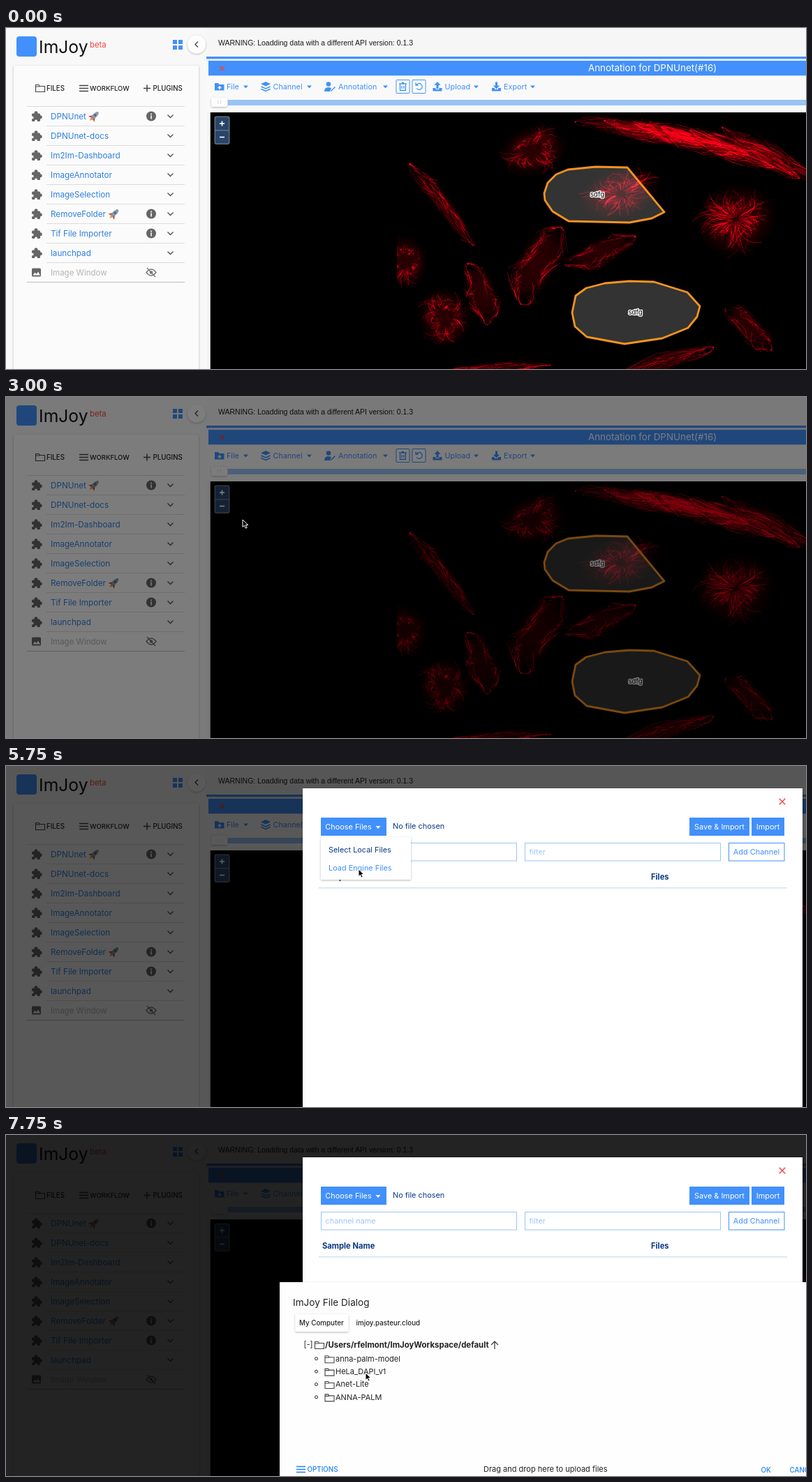
Recreate the animation shown at these times as an HTML page with a canvas. Size 1146 by 489 pixels, loop 8 s.

```html
<!DOCTYPE html>
<html lang="en">
<head>
<meta charset="utf-8">
<title>Image annotation workspace</title>
<style>
  html, body { margin: 0; width: 100%; height: 100%; overflow: hidden; background: #f6f6f6; }
  #stage { position: relative; width: 1146px; height: 489px; overflow: hidden; }
  canvas, svg { position: absolute; left: 0; top: 0; display: block; }
  text { font-family: Inter, Roboto, sans-serif; white-space: pre; }
  .arial { font-family: 'Liberation Sans', Arial, sans-serif; }
</style>
</head>
<body>
<div id="stage">
  <canvas id="cells" width="1146" height="489"></canvas>
  <svg id="ui" width="1146" height="489" viewBox="0 0 1146 489"></svg>
</div>
<script>
const BLUE = '#4290fb', DEEP = '#1f80fb', NAVY = '#0b3a82', GREY = '#666', INK = '#222', RED = '#f5413d';

/* ---------- microscope image ---------- */
const ctx = document.getElementById('cells').getContext('2d');
let seed = 71;
const rnd = () => {
  seed = (seed + 0x6D2B79F5) | 0;
  let v = Math.imul(seed ^ (seed >>> 15), 1 | seed);
  v ^= v + Math.imul(v ^ (v >>> 7), 61 | v);
  return ((v ^ (v >>> 14)) >>> 0) / 4294967296;
};
const spread = s => (rnd() * 2 - 1) * s;

// a dim body with fibres on top; fibre() returns points in the unit disc
function cell(x, y, a, b, deg, fibre) {
  ctx.save();
  ctx.translate(x, y);
  ctx.rotate(deg * Math.PI / 180);
  ctx.scale(a, b);
  const g = ctx.createRadialGradient(0, 0, 0, 0, 0, 1);
  g.addColorStop(0, 'rgba(110,0,6,.4)');
  g.addColorStop(0.6, 'rgba(110,0,6,.3)');
  g.addColorStop(1, 'rgba(90,0,0,0)');
  ctx.fillStyle = g;
  ctx.fillRect(-1, -1, 2, 2);
  ctx.scale(1 / a, 1 / b);
  for (let i = a * b * 0.05 + 25; i > 0; i--) {
    ctx.strokeStyle = `rgba(${170 + rnd() * 70 | 0},0,16,${0.15 + 0.4 * rnd() ** 2})`;
    ctx.lineWidth = 0.6 + rnd() * 0.6;
    ctx.beginPath();
    for (const [u, v] of fibre()) ctx.lineTo(u * a + spread(0.7), v * b + spread(0.7));
    ctx.stroke();
  }
  ctx.restore();
}
const steps = Array.from({ length: 9 }, (_, i) => i / 8);

// fibres leaving the centre towards a lobed rim
function star(x, y, a, b, core = 0.2) {
  const phase = rnd() * 6;
  cell(x, y, a, b, -15, () => {
    const th = rnd() * 2 * Math.PI, bend = spread(0.6), r0 = core + rnd() * 0.3;
    const r1 = (0.5 + rnd() * 0.5) * (0.85 + 0.25 * Math.sin(3 * th + phase));
    return steps.map(s => {
      const r = r0 + (r1 - r0) * s, q = th + bend * s * s;
      return [r * Math.cos(q), r * Math.sin(q)];
    });
  });
}
// fibres along an uneven spindle; hole keeps the nucleus empty
function spindle(x, y, a, b, deg, hole = 0) {
  const phase = rnd() * 6, curl = spread(0.3);
  cell(x, y, a, b, deg, () => {
    const k = Math.sign(spread(1)) * (hole + rnd() * (1 - hole));
    const from = spread(1), len = spread(0.6), tilt = spread(0.6);
    return steps.map(s => {
      const u = Math.max(-1, Math.min(1, from + len * s));
      const w = Math.sqrt(1 - u * u) * (0.85 + 0.25 * Math.sin(4 * u + phase + Math.sign(k)));
      return [u, w * (k + tilt * (s - 0.5)) + curl * u * u];
    });
  });
}
function paintCells() {
  ctx.fillStyle = '#000';
  ctx.fillRect(292.5, 121, 854, 368);
  ctx.beginPath();
  ctx.rect(560, 121, 586, 368);
  ctx.clip();
  ctx.globalCompositeOperation = 'lighter';
  star(755, 176, 50, 36, 0.25);
  star(880, 237, 60, 36, 0.1);
  star(1045, 275, 60, 52, 0.05);
  star(572, 335, 32, 38, 0.25);
  star(628, 415, 38, 44, 0.25);
  spindle(761, 338, 62, 30, -62, 0.5);
  spindle(852, 321, 54, 19, -22, 0.5);
  spindle(681, 380, 46, 23, 72, 0.5);
  spindle(1066, 430, 44, 18, 42, 0.4);
  spindle(626, 252, 74, 13, 52);
  spindle(935, 482, 82, 14, -18);
  spindle(700, 488, 80, 9, -4);
  // overlapping strands fanning out over the upper right
  for (let i = 0; i < 6; i++) spindle(900 + 40 * i, 145 + 8 * i, 85, 15, 8 + 4 * i);
}
paintCells();

/* ---------- interface ---------- */
const T = (x, y, s, size = 10.9, fill = NAVY, more = '') =>
  `<text x="${x}" y="${y + size * 0.36}" font-size="${size}" fill="${fill}" ${more}>${s}</text>`;
const R = (x, y, w, h, fill, more = '') =>
  `<rect x="${x}" y="${y}" width="${w}" height="${h}" fill="${fill}" ${more}/>`;
const C = (x, y, r, fill, more = '') => `<circle cx="${x}" cy="${y}" r="${r}" fill="${fill}" ${more}/>`;
const line = (d, color, w = 1.3) => `<path d="${d}" stroke="${color}" stroke-width="${w}" fill="none"/>`;
const solid = (d, color) => `<path d="${d}" fill="${color}"/>`;
const G = (id, s) => `<g id="${id}">${s}</g>`;
const at = (x, y, s, turn = 0) => `<g transform="translate(${x} ${y}) rotate(${turn})">${s}</g>`;
const each = (items, draw) => items.map(draw).join('');
const BOLD = 'font-weight="700"', MED = 'font-weight="500"', MID = 'text-anchor="middle"';
const SHADOW = 'filter="url(#soft)"';

const folder = (x, y) => at(x, y, line('M.5 10.5V.5h4.5l1.5 2h7v8zM.5 3h6', '#444', 1.1));
const caret = (x, y, c = BLUE) => solid(`M${x} ${y}h7l-3.5 4z`, c);
const cross = (x, y, r) => at(x, y, line(`M${-r} 0h${2 * r}M0 ${-r}v${2 * r}`, RED, 1.4), 45);
const plus = (x, y, r, c) => line(`M${x - r} ${y}h${2 * r}m${-r} ${-r}v${2 * r}`, c, 1.5);
const bars = (x, y, c) => line(`M${x} ${y}h13m-13 4h13m-13 4h13`, c, 1.4);
const puzzle = y => at(36, y - 8,
  R(1, 4, 12, 11.5, GREY, 'rx="1.5"') + C(7, 3.2, 2.5, GREY) + C(13.2, 9.2, 2.5, GREY) +
  C(1.6, 10, 2, '#fbfbfb') + C(7, 15, 2, '#fbfbfb'));
const rocket = (x, y) => at(x, y,
  solid('M0-3l6 9-6-2-6 2z', '#c8402f') + solid('M-2 5h4l-2 4z', '#f59a23') +
  '<ellipse rx="3" ry="7" cy="-1.5" fill="#8b97a3"/>' + C(0, -2, 1.4, '#2d5f8c'), 45);
const info = y => C(208, y, 7, GREY) + line(`M208 ${y - 4}v2m0 1v5`, '#fff', 1.6);
const chevron = y => line(`M231.5 ${y - 2}l4 4 4-4`, '#555', 1.4);

const plugins = ['DPNUnet 🚀', 'DPNUnet-docs', 'Im2Im-Dashboard', 'ImageAnnotator', 'ImageSelection', 'RemoveFolder 🚀', 'Tif File Importer', 'launchpad'];
const list = each(plugins, (entry, i) => {
  const y = 126.5 + 28 * i, name = entry.replace(' 🚀', ''), starred = name !== entry;
  return R(i ? 58 : 30, y - 14.5, i ? 198 : 226, 1, '#dcdcdc') +
    puzzle(y) + T(64, y, name, 11.7, '#2f7fe0') + chevron(y) +
    (starred || name.startsWith('Tif') ? info(y) : '') +
    (starred ? rocket(72 + name.length * 6.9 + (i ? 0 : 6), y) : '');
});

const sidebar = R(0, 0, 288, 489, '#f8f8f8') + R(11, 54, 265, 450, '#fbfbfb', SHADOW) +
  R(15, 12, 29, 29, BLUE, 'rx="4"') + T(47, 27.5, 'ImJoy', 24.7, '#111') + T(120, 24, 'beta', 11.3, RED) +
  each([0, 1, 2, 3], i => R(239 + 8 * (i % 2), 17 + 8 * (i >> 1), 6, 6, BLUE)) +
  folder(42, 81) + T(58, 86.5, 'FILES', 9.7, INK, MED) +
  bars(105, 82.5, '#444') + T(120, 86.5, 'WORKFLOW', 9.5, INK, MED) +
  plus(202, 86.5, 5, '#444') + T(210.5, 86.5, 'PLUGINS', 9.7, INK, MED) +
  list + R(58, 336, 198, 1, '#dcdcdc') +
  R(37, 344.5, 13, 12, GREY, 'rx="1.5"') + solid('M38.5 354.5l3-4 2 2.5 2.5-3.5 3 5z', '#fbfbfb') +
  T(64, 350.5, 'Image Window', 11.5, '#b4b4b4') +
  line('M201 350.5q7-9 14 0q-7 9-14 0zM202 344l12 13', '#777', 1.4) + C(208, 350.5, 2.2, '#777') +
  R(30, 364, 226, 1, '#bcbcbc');

const tool = (x, name, end, icon) =>
  at(x, 84, icon) + T(x + (name === 'Annotation' ? 20 : 17), 84, name, 10.8, 'currentColor') + caret(end, 82.5, 'currentColor');
const fill = d => solid(d, 'currentColor'), pen = d => line(d, 'currentColor', 1.5);
const tray = 'M0 2h4v2h5v-2h4v4.5h-13z';
const toolbar = R(287, 0, 859, 41, '#f6f6f6') + R(287, 41, 859, 3.5, BLUE) + R(287, 44.5, 859, 2.5, '#e6eefa') +
  T(304, 21, 'WARNING: Loadding data with a different API version: 0.1.3', 10.5, '#1a1a1a', 'class="arial"') +
  R(290, 47, 856, 21.5, BLUE) + cross(309.5, 58, 4.5) +
  T(926, 57.5, 'Annotation for DPNUnet(#16)', 13.4, '#fff', MID) +
  R(288, 68.5, 858, 52.5, '#f9f9f9') + R(288, 121, 4.5, 368, '#f4f4f4') +
  `<g color="${BLUE}">` +
  G('fileBtn', tool(299, 'File', 340, fill('M0-5h5l1.5 2h7v8.5h-13.5z') + plus(7, 1.5, 2.5, '#fff'))) +
  tool(365.5, 'Channel', 431, fill('M6.5-7l7 3.2-7 3.2-7-3.2z') + pen('M0 0l6.5 3 6.5-3M0 3.5l6.5 3 6.5-3')) +
  tool(456, 'Annotation', 540, C(6, -3.5, 3.3, BLUE) + fill('M0 7q0-6 6-6 3 0 4 1.5l-2 4.5z') + pen('M9.5 6.5l6-6')) +
  tool(611.5, 'Upload', 670, fill('M6.5-7l4.5 5h-3v5h-3v-5h-3z' + tray)) +
  tool(696, 'Export', 751, fill('M5-6.5h3v5h3l-4.5 5-4.5-5h3z' + tray)) + '</g>' +
  each([559, 582], x => R(x, 74.5, 19, 19, '#fff', `stroke="${BLUE}" rx="1"`)) +
  line('M564.5 81v8.5h8V81M563 80h11m-7-1.5h3M567 83v4m3-4v4', BLUE) +
  line('M588 81.5a4.5 4.5 0 1 1 0 5M587 78.5v3.5h3.5', BLUE) +
  R(318, 103, 828, 8, '#99c3f6') + R(294, 100, 23, 13, '#fcfcfc', `rx="3" ${SHADOW}`) + line('M303.5 104v5m4-5v5', '#ddd', 1);

const region = (pts, x, y) =>
  `<polygon points="${pts}" fill="rgba(255,255,255,.2)" stroke="#f8941f" stroke-width="2.8" stroke-linejoin="round"/>` +
  T(x, y, 'sdfg', 9.6, '#000', `${MID} stroke="#fff" stroke-width="2.6" stroke-linejoin="round" paint-order="stroke"`);
const viewer =
  region('890,200 943,264 925,273 893,279 806,277 783,263 772,247 771,237 776,222 788,210 805,203 845,199', 847, 239) +
  region('831,373 858,366 893,363 928,364 976,379 994,399 990,414 977,430 940,445 886,453 832,443 815,428 811,408 816,384', 901.5, 408) +
  R(298.5, 126.5, 22, 40.5, '#67707a', 'rx="3"') +
  each([128, 147.5], y => R(300, y, 19, 18, '#28456c', 'rx="1.5"') + line(`M306 ${y + 9}h7`, '#fff', 1.6)) +
  line('M309.5 133.5v7', '#fff', 1.6);

const collapse = C(273, 23.5, 13, '#fdfdfd', SHADOW) + line('M275 19.5l-4 4 4 4', '#444');

const button = (x, y, w, s, id = '', tx = w / 2) =>
  R(x, y, w, 26, BLUE, id && `id="${id}"`) + T(x + tx, y + 13.3, s, 10.9, '#fff', MID);
const fileMenu = R(293, 101, 149, 90, '#fff', SHADOW) + R(298, 105.5, 139, 23, '#c3dcfa') +
  T(304, 117, 'train / 19661_221_G2_1', 11.15, '#3577d4') + T(304, 142.5, 'train / 19663_395_C4_2', 11.15) +
  button(298, 160, 94, 'Import Samples', 'importBtn') + button(398, 160, 39, 'Load');

const box = (x, w, c) => R(x, 110.5, w, 25.5, '#fff', `stroke="${c}"`);
const field = (x, s) => box(x, 280, '#9cc4f7') + T(x + 6, 123.5, s, 10.9, '#9dc5f8');
const dialog = R(425, 32, 716, 470, '#fff', SHADOW) + cross(1112, 51, 6) +
  button(451, 74, 94, 'Choose Files', 'chooseBtn', 39.5) + caret(529.5, 86, '#fff') +
  T(554, 86, 'No file chosen') + button(979, 74, 86, 'Save &amp; Import') + button(1068, 74, 47, 'Import') +
  field(451.5, 'channel name') + field(743.5, 'filter') +
  box(1035.5, 79.5, BLUE) + T(1075, 123.5, 'Add Channel', 10.9, BLUE, MID) +
  T(453, 159, 'Sample Name', 11.2, NAVY, BOLD) + T(924, 159, 'Files', 11.2, NAVY, BOLD) + R(448, 174, 671, 1.5, '#cfe3fb');

const chooseMenu = R(451, 102, 129, 61, '#fff', SHADOW) +
  G('pickLocal', T(462, 120, 'Select Local Files', 10.9, 'currentColor')) +
  G('pickEngine', T(462, 146, 'Load Engine Files', 10.9, 'currentColor'));

const dirs = each(['anna-palm-model', 'HeLa_DAPI_v1', 'Anet-Lite', 'ANNA-PALM'], (name, i) => {
  const y = 320.7 + 18.4 * i;
  return C(444.5, y, 2, 'none', `stroke="${INK}"`) + folder(456.5, y - 4.5) + T(472, y, name, 11, INK);
});
const browser = R(392, 211, 780, 300, '#fefefe', SHADOW) + T(411, 240, 'ImJoy File Dialog', 13.6, INK) +
  R(414.5, 257, 76, 25, '#fff', SHADOW) + T(420, 269, 'My Computer', 9.8, INK, MED) +
  T(501.5, 269, 'imjoy.pasteur.cloud', 9.8, INK, MED) +
  T(426.5, 300.5, '[-]', 11, INK) + folder(442, 296) +
  T(457, 300.5, '/Users/rfelmont/ImJoyWorkspace/default', 11.4, INK, BOLD) +
  line('M700 307v-11m-5 5l5-5 5 5', '#444') + dirs +
  bars(416, 475.5, DEEP) + T(431.5, 479, 'OPTIONS', 9.8, DEEP, MED) +
  T(684, 479, 'Drag and drop here to upload files', 11, INK) +
  T(1081.5, 480, 'OK', 9.8, DEEP, MED) + T(1122.5, 480, 'CANCEL', 9.8, DEEP, MED);

const arrow = '<path d="M0 0v10.5l2.5-2.3 1.8 4 1.9-.9-1.8-3.8h3.4z" fill="#000" stroke="#fff"/>';
const el = id => document.getElementById(id);
el('ui').innerHTML =
  '<defs><filter id="soft" x="-20%" y="-20%" width="140%" height="140%"><feDropShadow dx="0" dy="1" stdDeviation="1.6" flood-opacity=".28"/></filter></defs>' +
  sidebar + toolbar + viewer + collapse + G('fileMenu', fileMenu) +
  R(0, 0, 1146, 489, '#000', 'id="dim"') +
  G('dialog', dialog) + G('chooseMenu', chooseMenu) + G('browser', browser) + G('cursor', arrow);

/* ---------- timeline ---------- */
const LOOP = 8000, TICK = 250;
const ramp = (t, a, b) => Math.max(0, Math.min(1, (t - a) / (b - a)));
const smooth = f => f * f * (3 - 2 * f);
const within = (t, a, b) => t >= a && t < b;
const show = (id, on) => { el(id).style.display = on ? '' : 'none'; };
const tint = (id, on, yes, no) => { el(id).style.color = el(id).style.fill = on ? yes : no; };

// each move: start, end, destination
const moves = [
  [500, 1500, 326, 84], [1500, 2750, 339, 176], [3500, 4750, 513, 97],
  [4750, 5250, 505, 148], [6000, 6750, 527, 251], [6750, 7750, 515, 341]
];
const cursorAt = t => moves.reduce(([x, y], [a, b, u, v]) => {
  const f = smooth(ramp(t, a, b));
  return [x + (u - x) * f, y + (v - y) * f];
}, [262, 6]);

function render(ms) {
  const t = Math.floor(ms % LOOP / TICK) * TICK;
  show('cursor', t >= 500);
  el('cursor').setAttribute('transform', `translate(${cursorAt(t)})`);
  const fade = 1 - (1 - ramp(t, 2750, 3250)) ** 4;
  el('dim').setAttribute('opacity', 0.54 * fade + 0.32 * ramp(t, 5500, 6250));
  show('fileMenu', within(t, 1500, 3000));
  show('dialog', t >= 3250);
  show('chooseMenu', within(t, 4750, 6250));
  show('browser', t >= 6250);
  tint('fileBtn', within(t, 1250, 1750), DEEP, BLUE);
  tint('importBtn', within(t, 2500, 3000), DEEP, BLUE);
  tint('chooseBtn', within(t, 4500, 5750), DEEP, BLUE);
  tint('pickLocal', t === 5000, BLUE, NAVY);
  tint('pickEngine', t >= 5250, BLUE, NAVY);
}
const start = performance.now();
function frame() {
  render(performance.now() - start);
  requestAnimationFrame(frame);
}
frame();
</script>
</body>
</html>
```
